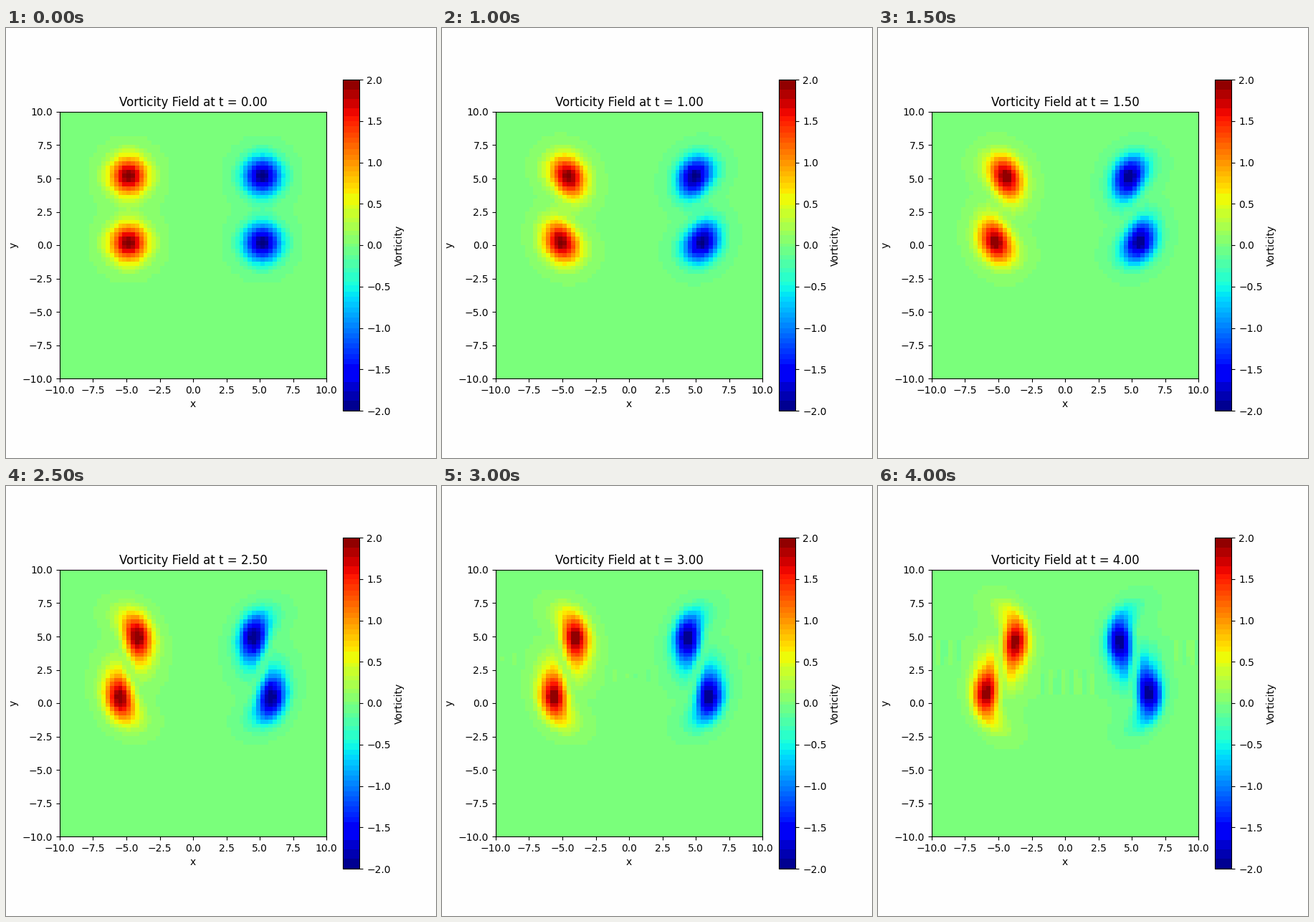
A matplotlib script that plays this animation: 600 by 600 pixels, repeating every 4500 ms.

```python
import numpy as np
import matplotlib.pyplot as plt
from matplotlib.animation import FuncAnimation
from matplotlib.colors import ListedColormap

N, L = 64, 20.0
NU = 0.001
DT, STEPS = 0.05, 10      # ten steps per shown frame
FRAMES, INTERVAL = 9, 500
PAPER = "#fefefe"

axis = np.linspace(-L / 2, L / 2, N, endpoint=False)
X, Y = np.meshgrid(axis, axis)
k = 2 * np.pi * np.fft.fftfreq(N, L / N)
KX, KY = np.meshgrid(k, k)
K2 = KX**2 + KY**2
K2_INV = 1 / np.where(K2 == 0, 1, K2)
CUT = 2 / 3 * k.max()
KEEP = np.where((abs(KX) < CUT) & (abs(KY) < CUT), 1.0, 0.0)


def vortex(x0, y0, strength):
    return strength * np.exp(-((X - x0)**2 + (Y - y0)**2) / 2)


def real(f):
    return np.fft.ifft2(f).real


def rate(wh):
    """Vorticity equation in Fourier space; positive vortices turn clockwise."""
    psi = wh * K2_INV
    u, v = real(-1j * KY * psi), real(1j * KX * psi)
    advection = u * real(1j * KX * wh) + v * real(1j * KY * wh)
    return -KEEP * np.fft.fft2(advection) - NU * K2 * wh


def step(wh):
    a = rate(wh)
    b = rate(wh + DT / 2 * a)
    c = rate(wh + DT / 2 * b)
    d = rate(wh + DT * c)
    return wh + DT / 6 * (a + 2 * b + 2 * c + d)


def solve():
    w = (vortex(-5, 5, 2) + vortex(-5, 0, 2)
         + vortex(5, 5, -2) + vortex(5, 0, -2))
    fields = [w]
    wh = np.fft.fft2(w)
    for _ in range(FRAMES - 1):
        for _ in range(STEPS):
            wh = step(wh)
        fields.append(real(wh))
    return fields


def banded_jet():
    """Jet with similar shades merged into flat bands."""
    rgb = plt.get_cmap("jet")(np.arange(256), bytes=True)[:, :3].astype(int)
    bands = rgb // [32, 16, 32]
    out = np.empty((256, 3))
    for band in np.unique(bands, axis=0):
        same = (bands == band).all(axis=1)
        out[same] = rgb[same].mean(axis=0) // 1
    return ListedColormap(out / 255)


fields = solve()

fig, ax = plt.subplots(figsize=(6, 6), dpi=100, facecolor=PAPER)
image = ax.imshow(fields[0], extent=[-10, 10, -10, 10], origin="lower",
                  cmap=banded_jet(), vmin=-2, vmax=2)
fig.colorbar(image, ax=ax, label="Vorticity")
ax.set_xlabel("x")
ax.set_ylabel("y")
title = ax.set_title("")


def draw(i):
    image.set_data(fields[i])
    title.set_text(f"Vorticity Field at t = {i * STEPS * DT:.2f}")
    return image, title


anim = FuncAnimation(fig, draw, frames=FRAMES, interval=INTERVAL,
                     repeat=True, repeat_delay=0)
plt.show()
```
